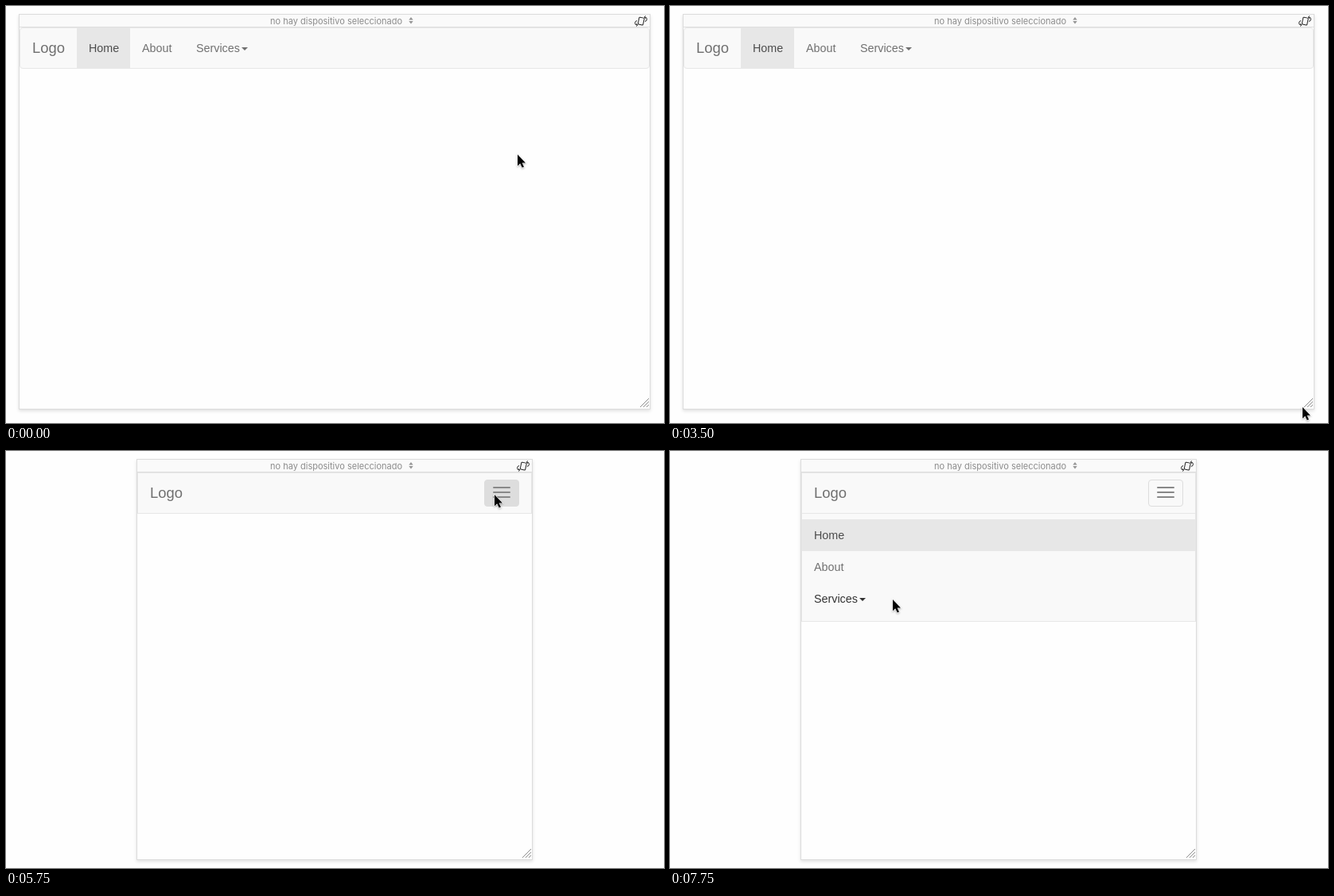
Animation, 827 px wide and 525 px high, one loop 8000 ms. Source, as an HTML page:

```html
<!DOCTYPE html>
<html lang="es">
<head>
<meta charset="utf-8">
<title>Responsive navbar</title>
<style>
  html, body { margin: 0; width: 100%; height: 100%; overflow: hidden; background: #fefefe; }
  body { position: relative; font: 14.3px/20px "Liberation Sans", Arial, sans-serif; color: #707070; }
  body *, body *::before { box-sizing: border-box; }
  #view {
    position: absolute; top: 10px; background: #fefefe;
    border: 1px solid #dcdcdc; box-shadow: 0 2px 4px rgba(0, 0, 0, .12);
  }
  #bar { height: 16px; background: #fafafa; border-bottom: 1px solid #dedede; }
  #device { position: absolute; left: 332px; top: 12px; font: 11px/15px Inter, sans-serif; color: #8c8c8c; white-space: nowrap; }
  svg { position: absolute; overflow: visible; }
  #arrows { left: 506px; top: 14px; fill: #959595; }
  #rotate { right: 3px; top: 1px; fill: none; stroke: #222; }
  #grip { right: 0; bottom: 1px; stroke: #8c8c8c; }
  #nav {
    position: relative; overflow: hidden; height: 52px;
    background: #f9f9f9; border: 1px solid #e7e7e7;
  }
  #brand { position: absolute; left: 15px; top: 15px; font-size: 18.4px; }
  .item { position: absolute; height: 50px; padding: 15px; white-space: nowrap; }
  .item.active { color: #4c4c4c; background: #e7e7e7; }
  .item.hover { color: #333; }
  .caret {
    display: inline-block; margin-left: 2px; vertical-align: middle;
    border: 4px solid transparent; border-top-color: currentColor; border-bottom: 0;
  }
  #toggle {
    position: absolute; right: 15px; top: 8px; width: 44px; height: 34px;
    border: 1px solid #ddd; border-radius: 4px;
  }
  #toggle.hover { background: #ddd; }
  #toggle::before {
    content: ""; position: absolute; left: 10px; top: 8px; width: 22px; height: 2px;
    border-radius: 1px; background: #888; box-shadow: 0 6px #888, 0 12px #888;
  }
  #rule { position: absolute; left: 0; right: 0; top: 50px; height: 1px; background: #e7e7e7; }
  .wide #nav { border-radius: 4px; }
  .wide #toggle, .wide #rule { display: none; }
  .narrow .item { left: 0 !important; width: 100% !important; height: 40px; padding: 10px 15px; }
  .narrow .item:nth-of-type(2) { top: 58px; }
  .narrow .item:nth-of-type(3) { top: 98px; }
  .narrow .item:nth-of-type(4) { top: 138px; }
  #cursor { left: 0; top: 0; filter: drop-shadow(0 1px 1px rgba(0, 0, 0, .3)); }
</style>
</head>
<body>
<div id="view">
  <div id="bar">
    <svg id="rotate" width="16" height="14" viewBox="0 0 16 14">
      <rect x="5" y="2.5" width="6.5" height="9" rx="1" transform="rotate(12 8 7)"/>
      <path d="M3 6.5 Q.5 7 .5 9.5 T3.5 12 M2.2 10.3 L3.8 12 L2.2 13.5 M13 7.5 Q15.5 7 15.5 4.5 T12.5 2 M13.8 .5 L12.2 2 L13.8 3.7"/>
    </svg>
  </div>
  <div id="nav">
    <div id="brand">Logo</div>
    <div class="item active" style="left:71px;width:67px">Home</div>
    <div class="item" id="about" style="left:138px">About</div>
    <div class="item" id="services" style="left:206px">Services<span class="caret"></span></div>
    <span id="rule"></span>
    <span id="toggle"></span>
  </div>
  <svg id="grip" width="13" height="13"><path d="M1 12 L12 1 M5 12 L12 5 M9 12 L12 9"/></svg>
</div>
<div id="device">no hay dispositivo seleccionado</div>
<svg id="arrows" width="6" height="9"><path d="M.3 3.5 L3 0 L5.7 3.5Z M.3 5 L3 8.5 L5.7 5Z"/></svg>
<svg id="cursor" width="12" height="18">
  <path d="M0 0 V14.2 L3.2 11.2 L5.7 16.6 L8 15.6 L5.6 10.4 H10Z" stroke="#fff" stroke-width="1.2" paint-order="stroke"/>
</svg>
<script>
const LOOP = 8000, TICK = 250, CENTER = 413, TOP = 10, BREAKPOINT = 768;

const el = id => document.getElementById(id);
const glide = (start, end, to, power = 1.5) => ({ start, end, to, power });

// Ease out through each glide in turn, holding still in between.
function follow({ from, glides }, t) {
  return glides.reduce((value, { start, end, to, power }) => {
    const u = Math.min(1, Math.max(0, (t - start) / (end - start)));
    const eased = 1 - (1 - u) ** power;
    return value.map((v, i) => v + (to[i] - v) * eased);
  }, from).map(Math.round);
}

// tip x, tip y
const cursorPath = { from: [643, 187], glides: [
  glide(0, 500, [781, 423]),           // to the resize corner
  glide(500, 1250, [798, 503], 2),
  glide(1750, 2250, [744, 503]),       // miss it and come back
  glide(2750, 3250, [795, 505]),
  glide(3750, 4500, [681, 507], 1.2),  // drag the corner
  glide(4500, 5000, [648, 510], 0.5),
  glide(5000, 5250, [601, 188]),       // to the menu button
  glide(5250, 5750, [614, 55]),
  glide(7000, 7250, [524, 93]),        // down to the menu items
  glide(7250, 7750, [280, 187], 2)
] };
// half width, bottom edge
const viewPath = { from: [397, 508], glides: [
  glide(3750, 4500, [283, 511], 1.2),
  glide(4750, 5000, [249, 515])
] };
// height
const navPath = { from: [52], glides: [glide(6000, 6500, [188], 2.45)] };

function hover(id, x, y) {
  const box = el(id).getBoundingClientRect();
  const inside = x >= box.left && x < box.right && y >= box.top && y < box.bottom;
  el(id).classList.toggle('hover', inside);
}

function render(t) {
  const [x, y] = follow(cursorPath, t);
  const [half, bottom] = follow(viewPath, t);
  const [navHeight] = follow(navPath, t);
  const view = el('view');
  view.style.left = CENTER - half + 'px';
  view.style.width = half * 2 + 'px';
  view.style.height = bottom - TOP + 'px';
  view.className = half * 2 < BREAKPOINT ? 'narrow' : 'wide';
  el('nav').style.height = navHeight + 'px';
  el('cursor').style.transform = `translate(${x}px, ${y}px)`;
  for (const id of ['toggle', 'about', 'services']) hover(id, x, y);
}

const begin = performance.now();
function tick() {
  const t = (performance.now() - begin) % LOOP;
  render(Math.floor(t / TICK) * TICK);
  requestAnimationFrame(tick);
}
tick();
</script>
</body>
</html>
```
